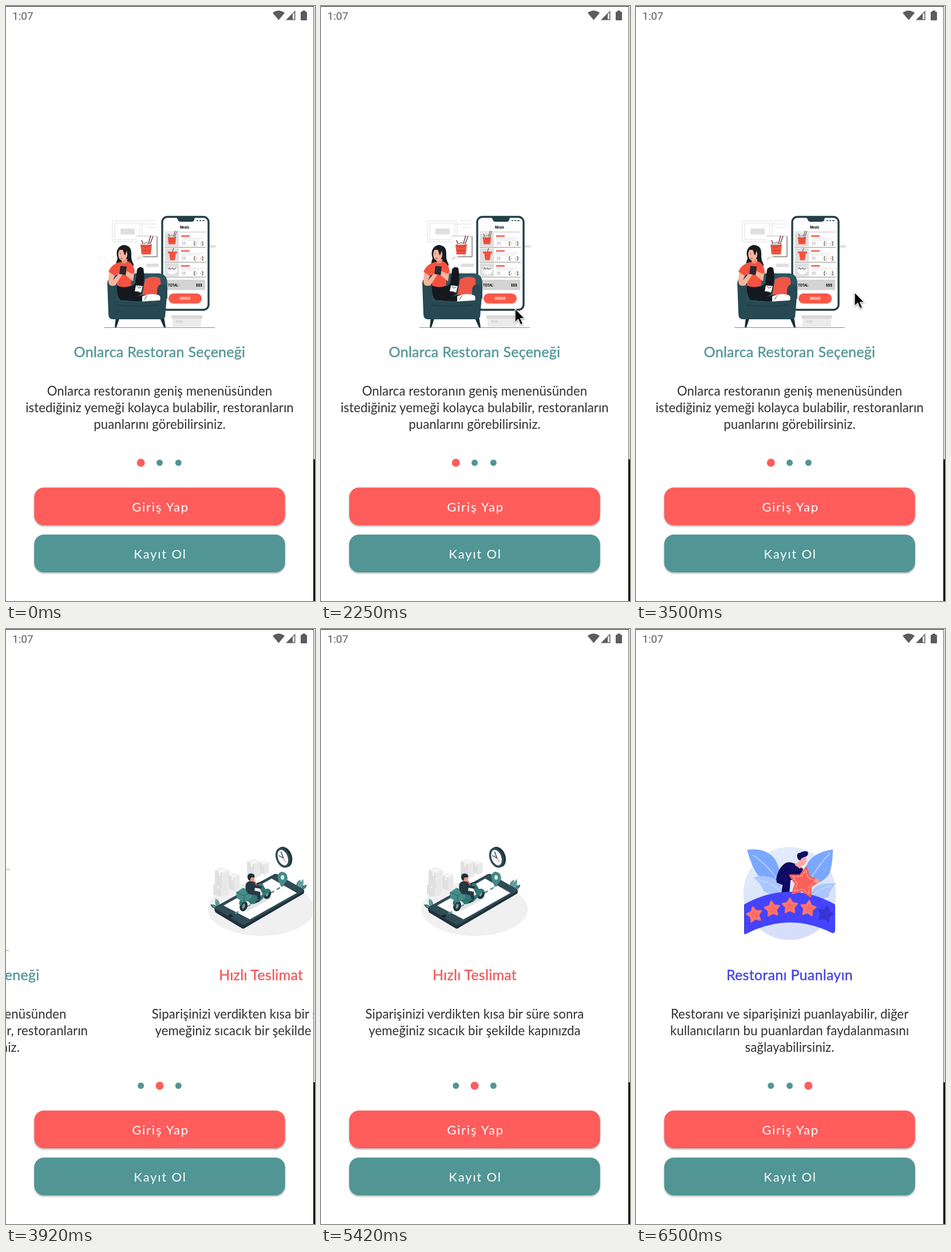
These frames come from a looping animation (540 by 1037 pixels, 6.58 s). An HTML page:

```html
<!DOCTYPE html>
<html lang="tr">
<head>
<meta charset="utf-8">
<title>Onboarding</title>
<style>
  html, body { margin: 0; width: 100%; height: 100%; overflow: hidden; background: #fff; }
  svg { display: block; width: 100vw; height: 100vh; }
  text { font-family: Lato, "Open Sans", sans-serif; }
  .title { font-size: 25px; letter-spacing: .28px; text-anchor: middle; stroke-width: .4px; }
  .body { font-size: 22.2px; letter-spacing: .07px; fill: #303035; text-anchor: middle; }
  .label { font-size: 22px; letter-spacing: 1.8px; fill: #fff; text-anchor: middle; }
  .clock { font: 19px Roboto, sans-serif; fill: #5c5c5c; }
  .tiny { font: 700 5.5px Inter, sans-serif; }
  .button { filter: drop-shadow(0 2px 1.5px rgba(0, 0, 0, .3)); }
  #cursor { filter: drop-shadow(0 1px 1.5px rgba(0, 0, 0, .45)); }
</style>
</head>
<body>
<svg viewBox="0 0 540 1037" preserveAspectRatio="none">
  <defs>
    <clipPath id="screen"><path d="M0 0H537V1037H0Z"/></clipPath>
    <linearGradient id="sky" x2=".3" y2="1">
      <stop stop-color="#e5eefd"/><stop offset="1" stop-color="#d6defa"/>
    </linearGradient>
    <g id="takeaway">
      <path d="M-5-5 L-8-15 M3-6 L8-23 M6-6 L12-22" stroke="#6b3b36" stroke-width="1.4"/>
      <path d="M-8-6 Q-7-12-3-9 Q0-14 3-9 Q8-12 8-6Z" fill="#eadfd2" stroke="#55474a" stroke-width=".8"/>
      <path d="M-10-6 L10-7 L8 10 H-8Z" fill="#f4523f"/>
      <path d="M-10-6 L0-2 L10-7 M-7 3H7" fill="none" stroke="#a83a30"/>
    </g>
    <g id="sprout">
      <path d="M0 0 Q-9-8-6-19 Q4-15 0 0Z" fill="#4c9290"/>
      <path d="M0 0 Q-13-1-15-9 Q-5-10 0 0Z" fill="#356f72"/>
      <path d="M0 0 Q-3-10-5-17 M0 0-11-7" fill="none" stroke="#a8d0ca" stroke-width=".8"/>
    </g>
    <g id="crate">
      <path d="M0 0 12-5 25 0 13 5Z" fill="#f1f1f1"/>
      <path d="M0 0 13 5V30L0 25Z" fill="#e0e0e0"/>
      <path d="M13 5 25 0V25L13 30Z" fill="#e9e9e9"/>
      <path d="M7 2 18-3 20-2 9 4V10L7 9Z" fill="#fafafa"/>
    </g>
  </defs>

  <g clip-path="url(#screen)">
    <g id="strip">
      <g id="menu">
        <path d="M186 375H238V411H186Z M190 379H234V407H190Z M238 380H263M243 374H262M247 386H262" fill="none" stroke="#dedede"/>
        <path d="M200 388H225V398H200Z M355 417H367V421H355Z M245 449H267V455H245Z" fill="#dfdfdf"/>
        <path d="M291 544H341V559H291Z" fill="#ebebeb"/>
        <path d="M289 539H343V545H289Z M297 548H309V552H297Z" fill="#dadada"/>
        <path d="M172 560.5H365" stroke="#6d6d6d" stroke-width=".8"/>

        <rect x="273" y="367.5" width="81" height="162" rx="9" fill="#fff" stroke="#243f49" stroke-width="3.4"/>
        <path d="M296 367H333Q329 369 329 373Q328 376 324 376H305Q301 376 300 372Q299 369 296 367Z" fill="#243f49"/>
        <path d="M333 374H336M338 374H341M343 374H347" stroke="#243f49" stroke-width="1.6"/>
        <text class="tiny" x="312" y="388" text-anchor="middle">Meals</text>
        <path d="M277 394H349" stroke="#aaa" stroke-width=".8"/>
        <g id="rows"></g>
        <use href="#takeaway" transform="translate(290 408) scale(.72)"/>
        <path d="M285 430H297L295 443H287Z M283 428H299V431H283Z" fill="#f4523f"/>
        <path d="M291 428 293 422" stroke="#444"/>
        <path d="M281 459Q290 450 300 459Q299 467 290 468Q282 467 281 459Z" fill="#fff"/>
        <path d="M283 459 286 456 288 459 291 456 293 459 297 457" fill="none" stroke="#222"/>
        <path d="M278 477H348V495H278Z" fill="#d3d3d3"/>
        <text class="tiny" x="283" y="488.5">TOTAL:</text>
        <text class="tiny" x="332" y="488.5">$$$</text>
        <rect x="284" y="501" width="58" height="17.5" rx="8.7" fill="#fd5747"/>
        <text class="tiny" x="313" y="512" text-anchor="middle" fill="#fff">ORDER</text>

        <path d="M228 401H264V437H238L229 442L233 436" fill="#fff" stroke="#aaa" stroke-width=".8"/>
        <path d="M264 402V437H240" fill="none" stroke="#444" stroke-width=".8"/>
        <use href="#takeaway" transform="translate(245 423)"/>

        <path d="M192 542 190 560H193L199 542Z M268 542 276 560H279L276 542Z" fill="#172d34"/>
        <path d="M188 474Q190 465 205 466H266Q282 466 282 484V510H186Z" fill="#2e555e"/>
        <path d="M243 476Q256 469 269 474Q273 490 266 508Q251 512 238 506Z" fill="#ef5646"/>
        <path d="M189 508H273V543H189Z" fill="#2b5059"/>
        <path d="M177 483Q178 473 186 474Q194 476 194 488V514Q229 519 264 514V495Q265 485 273 485Q282 485 282 495L278 542Q275 546 268 546H187Q179 546 179 537Z" fill="#264952"/>
        <path d="M193 521Q230 526 266 521" fill="none" stroke="#183840"/>
        <path d="M197 421Q205 413 214 419Q219 422 219 432Q218 442 223 450L221 461H194Q190 451 195 440Q191 428 197 421Z" fill="#171c22"/>
        <path d="M194 487Q218 494 226 483L229 459Q234 452 240 457Q244 478 237 501Q223 512 201 513Q193 508 194 487Z" fill="#15191f"/>
        <path d="M204 512 244 503 243 514Q222 516 204 512Z" fill="#15191f"/>
        <path d="M202 441V449H212V441Z" fill="#e99177"/>
        <ellipse cx="204" cy="433" rx="8" ry="11" fill="#f7b59e"/>
        <path d="M197 425Q204 416 211 426L208 435L204 425Z" fill="#171c22"/>
        <path d="M199 432H201M205 432H207M200 440H204" stroke="#72443d"/>
        <path d="M200 446Q207 452 213 445Q224 449 225 465L219 467V487Q205 493 194 487V466L190 471L179 463Q185 449 200 446Z" fill="#f4523f"/>
        <path d="M180 464 190 470 187 478 199 465 204 467 191 487Q179 490 179 480Z M219 466 224 466 222 480 209 469 211 462Z" fill="#f7b59e"/>
        <path d="M200 453 211 454 209 469 198 467Z" fill="#252a31"/>
        <path d="M227 487 239 488 236 500 225 497Z M238 506Q254 499 267 504Q271 506 269 513L238 515Z" fill="#fff"/>
        <path d="M229 488 232 492 237 489M228 497 237 500M242 512 246 505" fill="none" stroke="#444"/>

        <text class="title" x="268.5" y="612" fill="#519595" stroke="#519595">Onlarca Restoran Seçeneği</text>
        <text class="body" x="268.5" y="679">Onlarca restoranın geniş menenüsünden</text>
        <text class="body" x="268.5" y="708">istediğiniz yemeği kolayca bulabilir, restoranların</text>
        <text class="body" x="268.5" y="737">puanlarını görebilirsiniz.</text>
      </g>

      <g id="delivery" transform="translate(537)">
        <ellipse cx="268.5" cy="488" rx="93" ry="47" fill="#f0f0f0"/>
        <use href="#crate" transform="translate(185 445) scale(1.05 .72)"/>
        <use href="#crate" transform="translate(188 420) scale(1.02 1.05)"/>
        <use href="#crate" transform="translate(212 429) scale(.78 .92)"/>
        <use href="#crate" transform="translate(244 405)"/>
        <use href="#crate" transform="translate(266 407) scale(.66 .7)"/>
        <use href="#sprout" transform="translate(195 489)"/>
        <use href="#sprout" transform="translate(331 456) scale(-1 1)"/>
        <use href="#sprout" transform="translate(338 455) scale(-.7 1)"/>
        <path d="M187 487Q188 485 191 483L292 427Q295 426 298 428L343 454Q345 457 343 461L242 520Q238 524 234 521L189 494Q187 491 187 487Z" fill="#1d323a"/>
        <path d="M189 485 292 428Q295 427 298 428L342 454Q344 456 341 458L241 515Q238 517 235 515L189 488Z" fill="#314c55"/>
        <path d="M203 482 287 435 331 460 249 506Z" fill="#fff"/>
        <path d="M223 496 308 447" stroke="#519595" stroke-width="2.6" stroke-dasharray="7 5"/>
        <ellipse cx="215" cy="500" rx="4" ry="2.5" fill="#182a31"/>
        <path d="M304 450 299 439Q295 426 304 423Q314 423 315 434Q314 440 304 450Z" fill="#458a88"/>
        <ellipse cx="306" cy="433" rx="3" ry="4" fill="#d8eeea"/>
        <path d="M243 489 286 466" stroke="#e2e2e2" stroke-width="6"/>
        <g fill="#7c9c9c" stroke="#20343c" stroke-width="4.5">
          <ellipse cx="238" cy="483" rx="4.5" ry="7" transform="rotate(18 238 483)"/>
          <ellipse cx="279" cy="462" rx="4.5" ry="6.5" transform="rotate(18 279 462)"/>
        </g>
        <path d="M230 478Q232 467 247 464L262 460Q267 469 271 462L262 443Q267 439 271 444L276 453Q285 451 286 459Q277 458 274 467Q266 479 250 480Q247 473 241 474Q235 476 233 484Z" fill="#347675"/>
        <path d="M225 459 237 451 252 457V469L239 477 226 469Z" fill="#458d89"/>
        <path d="M225 459 239 465 252 457M239 465V477" fill="none" stroke="#255f62"/>
        <path d="M242 444Q247 437 258 440L262 447 270 449 269 453 258 451 257 456 267 458 268 471 263 472 261 464 247 462Q239 455 242 444Z" fill="#253943"/>
        <path d="M250 431H257V439Q253 442 249 438Z" fill="#e99a83"/>
        <path d="M245 434Q244 426 251 426Q259 427 257 433L251 433 249 439Q246 438 245 434Z" fill="#20323b"/>
        <path d="M256 440 261 447" stroke="#ed5f57" stroke-width="1.5"/>
        <path d="M261 444 273 440M266 473 259 476" stroke="#20323b" stroke-width="2"/>
        <g transform="rotate(-20 308 398)">
          <ellipse cx="309.5" cy="398" rx="13" ry="18.5" fill="#1f343c"/>
          <ellipse cx="306.5" cy="398" rx="12" ry="18" fill="#314c55"/>
          <ellipse cx="306.5" cy="398" rx="8.5" ry="14" fill="#fff"/>
          <path d="M301 392 307 399V387" fill="none" stroke="#273e47" stroke-width="1.4"/>
          <path d="M307 399 309 407" stroke="#ed5f57"/>
        </g>

        <text class="title" x="268.5" y="612" fill="#ef5b5b" stroke="#ef5b5b">Hızlı Teslimat</text>
        <text class="body" x="268.5" y="679">Siparişinizi verdikten kısa bir süre sonra</text>
        <text class="body" x="268.5" y="708">yemeğiniz sıcacık bir şekilde kapınızda</text>
      </g>

      <g id="rating" transform="translate(1074)">
        <circle cx="268.5" cy="461" r="81" fill="url(#sky)"/>
        <path d="M194 385Q225 380 242 400Q254 418 253 449Q226 439 213 429Q202 414 194 385Z M344 384Q313 389 301 406Q291 424 296 452Q330 441 338 426Q344 410 344 384Z" fill="#7ba8ff"/>
        <path d="M205 433Q231 427 244 437Q254 448 258 464Q235 464 223 457Q219 443 205 433Z M350 443Q324 442 314 449Q305 456 302 470Q324 473 337 466Q339 453 350 443Z" fill="#a9c6ff"/>
        <path d="M204 394Q235 414 251 445M339 391Q315 414 300 447M214 437Q241 443 255 460M342 447Q323 451 307 465" fill="none" stroke="#d5e3ff" stroke-width="1.2"/>
        <path d="M245 436Q249 414 263 407Q272 405 281 411L292 418 288 431 270 438 268 461H254L256 446 246 442Z" fill="#0e0a62"/>
        <path d="M260 424 250 437M267 414 283 419M262 430 259 450" stroke="#3c35a8" stroke-dasharray="1 3"/>
        <path d="M285 396 297 395Q300 405 294 411L289 413 287 418 277 411 286 404Z" fill="#ffaaa2"/>
        <path d="M282 398Q280 390 287 390Q292 386 300 388Q302 393 298 396L290 399 287 403Q283 403 282 398Z" fill="#0e0a62"/>
        <path d="M189 480Q268 436 348 480V526Q347 532 341 529Q268 493 193 531Q189 534 189 529Z" fill="#4443ff"/>
        <path d="M189.5 481V530" stroke="#2b2bc4"/>
        <g id="stars"></g>
        <path d="M311 437Q319 432 321 440L316 446Z" fill="#ff9c93"/>

        <text class="title" x="268.5" y="612" fill="#4443e2" stroke="#4443e2">Restoranı Puanlayın</text>
        <text class="body" x="268.5" y="679">Restoranı ve siparişinizi puanlayabilir, diğer</text>
        <text class="body" x="268.5" y="708">kullanıcıların bu puanlardan faydalanmasını</text>
        <text class="body" x="268.5" y="737">sağlayabilirsiniz.</text>
      </g>
    </g>
  </g>

  <g id="dots"></g>
  <rect class="button" x="49.3" y="839.3" width="438.4" height="65.7" rx="17" fill="#ff5c5c"/>
  <text class="label" x="270" y="881">Giriş Yap</text>
  <rect class="button" x="49.3" y="921.3" width="438.4" height="65.7" rx="17" fill="#519595"/>
  <text class="label" x="269.5" y="963">Kayıt Ol</text>

  <text class="clock" x="11" y="24">1:07</text>
  <g fill="#5c5c5c">
    <path d="M466 12Q476 4 487 12L476.5 24.5Z"/>
    <path d="M489 24.5 505.5 8V24.5Z M501 14.5V23H504V11.5Z" fill-rule="evenodd"/>
    <path d="M518 8H523V10H525Q526 10 526 11V24Q526 25 525 25H516Q515 25 515 24V11Q515 10 516 10H518Z"/>
  </g>
  <path d="M0 0H538V1H0Z" fill="#111"/>
  <path d="M537 1H538.5V790H537Z" fill="#777"/>
  <path d="M538.5 0H540V790H538.5Z" fill="#eee"/>
  <path d="M537 790H540V1037H537Z" fill="#111"/>

  <path id="cursor" d="M0 0V24L5.5 18.7 9.5 28 13.5 26.3 9.5 17.3H17Z" fill="#000" stroke="#fff" stroke-width="1.2"/>
</svg>
<script>
const LOOP = 6580, PITCH = 537;
const SWIPES = [3500, 5580];
// Drag followed by a settling fling: [ms since start, page fraction]
const SWIPE = [[0, 0], [170, .1], [250, .27], [340, .48], [420, .67], [500, .79],
  [580, .875], [670, .935], [750, .972], [840, .993], [920, 1]];
const POINTER = [[250, 540, 640], [750, 370, 600], [1080, 278, 568], [1750, 278, 568],
  [2600, 382, 499], [3500, 382, 499]];
const POINTER_END = 3830;

const $ = id => document.getElementById(id);

function add(parent, tag, attrs) {
  const el = document.createElementNS(parent.namespaceURI, tag);
  for (const key in attrs) el.setAttribute(key, attrs[key]);
  return parent.appendChild(el);
}

function starPath(radius) {
  const points = Array.from({ length: 10 }, (_, i) => {
    const r = i % 2 ? radius * .53 : radius, a = i * Math.PI / 5 - Math.PI / 2;
    return `${(r * Math.cos(a)).toFixed(1)} ${(r * Math.sin(a)).toFixed(1)}`;
  });
  return `M${points.join("L")}Z`;
}

function addStar(x, y, radius, angle, fill, stitch) {
  const g = add($("stars"), "g", { transform: `translate(${x} ${y}) rotate(${angle})` });
  add(g, "path", { d: starPath(radius), fill, stroke: fill, "stroke-width": 3, "stroke-linejoin": "round" });
  if (stitch) add(g, "path", { d: starPath(radius * .8), fill: "none", stroke: stitch, "stroke-dasharray": radius > 20 ? "5 2" : "2 2" });
}

function addRow(y) {
  const rows = $("rows");
  const line = (d, stroke, width = 1) => add(rows, "path", { d, stroke, "stroke-width": width, fill: "none" });
  add(rows, "rect", { x: 278, y, width: 24, height: 23, fill: "#dedede" });
  line(`M306 ${y + 5}h15`, "#f4523f", 2.4);
  line(`M306 ${y + 9}h39m-39 3h32`, "#ddd");
  line(`M277 ${y + 24.5}h72`, "#777", .8);
  line(`M331 ${y + 15}h-2v6h2m11-6h2v6h-2`, "#333");
  line(`M332 ${y + 18}h2m5 0h2`, "#f4523f", 1.2);
  add(rows, "text", { class: "tiny", x: 307, y: y + 20, fill: "#bbb" }).textContent = "$$";
}

[396, 422, 448].forEach(addRow);
[[207, 498, -12], [238, 488, -7], [269, 483, 0], [301, 487, 8]]
  .forEach(([x, y, angle]) => addStar(x, y, 13.5, angle, "#fd6d64", "#ff9d92"));
addStar(331, 497, 13.5, 14, "#3734d3");
addStar(293, 442, 27, 10, "#fb6057", "#ffd0c9");
const dots = [235.7, 268.5, 301.3].map(cx => add($("dots"), "circle", { cx, cy: 796 }));

function sample(keys, t) {
  if (t <= keys[0][0]) return keys[0].slice(1);
  const next = keys.findIndex(key => key[0] >= t);
  if (next < 0) return keys[keys.length - 1].slice(1);
  const a = keys[next - 1], b = keys[next], u = (t - a[0]) / (b[0] - a[0]);
  return a.slice(1).map((value, i) => value + (b[i + 1] - value) * u);
}

function draw(t) {
  const page = SWIPES.reduce((sum, start) => sum + sample(SWIPE, t - start)[0], 0);
  $("strip").setAttribute("transform", `translate(${-page * PITCH})`);
  dots.forEach((dot, i) => {
    const active = i === Math.round(page);
    dot.setAttribute("r", active ? 7 : 5.5);
    dot.setAttribute("fill", active ? "#ff5c5c" : "#519595");
  });
  const [x, y] = sample(POINTER, t);
  const visible = t >= POINTER[0][0] && t < POINTER_END;
  $("cursor").setAttribute("visibility", visible ? "visible" : "hidden");
  $("cursor").setAttribute("transform", `translate(${x - page * PITCH} ${y})`);
}

// The picture advances twelve times a second, on 10 ms marks
const started = performance.now();
function tick() {
  const t = (performance.now() - started) % LOOP;
  const step = Math.floor((t + 4) * 12 / 1000);
  draw(Math.round(step * 100 / 12) * 10);
  requestAnimationFrame(tick);
}
draw(0);
requestAnimationFrame(tick);
</script>
</body>
</html>
```
